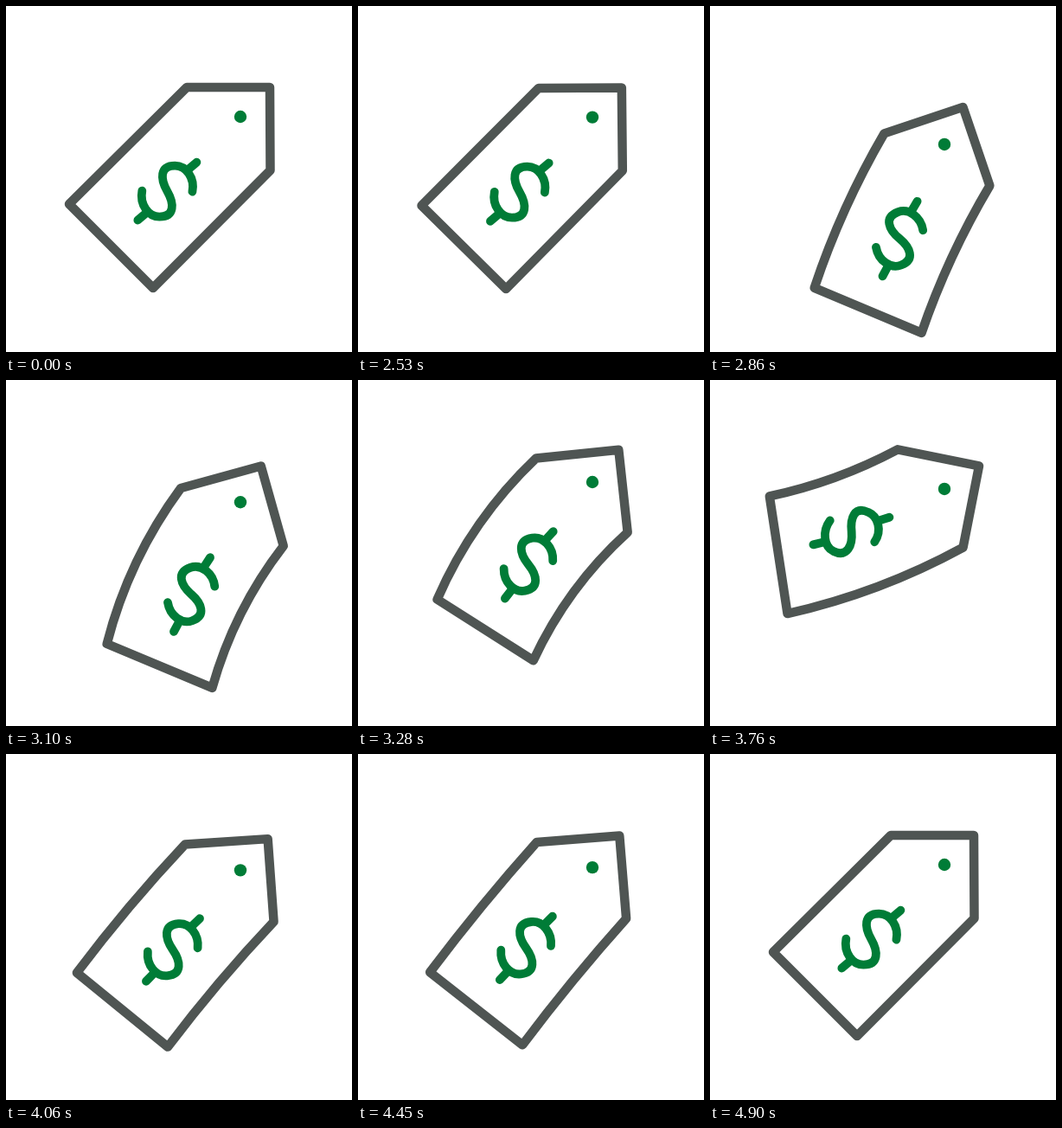
Animation of 400 by 400 pixels, one loop 4990 ms. Source, as an HTML page with a canvas:

```html
<!DOCTYPE html>
<html lang="en">
<head>
<meta charset="utf-8">
<title>Swinging price tag</title>
<style>
  html, body { margin: 0; width: 100%; height: 100%; overflow: hidden; background: #fff; }
  canvas { display: block; width: 100vmin; height: 100vmin; }
</style>
</head>
<body>
<canvas id="stage" width="400" height="400"></canvas>
<script>
const ctx = document.getElementById('stage').getContext('2d');
const LOOP = 4990, START = 2530, STEP = 30;
const REST = 2500, SETTLED = 4900;
const GREY = '#4f5553', GREEN = '#007c37';
const HOLE_X = 271, HOLE_Y = 128;

// Tag geometry relative to the hole, at rest
const A = [-62, -34], B = [34, -34], C = [34.5, 62], D = [-101, 198], E = [-198, 101];
const PIVOT = [-78, 78], PRINT = [-84.5, 86.5];
const LENGTH = 191.8, WIDTH = 136.6;

const rad = deg => deg * Math.PI / 180;
const add = (p, q) => [p[0] + q[0], p[1] + q[1]];
const sub = (p, q) => [p[0] - q[0], p[1] - q[1]];
const scale = (p, f) => [p[0] * f, p[1] * f];
const mix = (p, q, f) => add(scale(p, 1 - f), scale(q, f));
function rotate([x, y], a) {
  const c = Math.cos(a), s = Math.sin(a);
  return [x * c - y * s, x * s + y * c];
}

// Three eased swings out of rest, then back to rest
function swing(t, times, peaks) {
  const at = [REST, ...times, SETTLED], values = [0, ...peaks, 0];
  if (t <= REST || t >= SETTLED) return 0;
  const i = at.findIndex(end => t < end) - 1;
  const s = (t - at[i]) / (at[i + 1] - at[i]);
  return values[i] + (values[i + 1] - values[i]) * s * s * (3 - 2 * s);
}

// The hole leads, the head follows, the tail lags behind
function poseAt(t) {
  const tailTimes = [3230, 3750, 4120];
  return {
    y: HOLE_Y + swing(t, [2870, 3430, 3970], [32, -19, 6.5]),
    head: rad(swing(t, [2920, 3710, 4170], [-19.6, 12, -6.5])),
    bend: rad(swing(t, tailTimes, [-7.5, 25, -4])),
    curl: rad(swing(t, tailTimes, [-12, 8, -4]))
  };
}

// A long edge bows into an even arc
function edge(from, to, curl) {
  const third = scale(sub(to, from), 1 / 3);
  return [from, add(from, rotate(third, -curl)), sub(to, rotate(third, curl)), to];
}
function onCurve([p, q, r, s], t) {
  const a = mix(p, q, t), b = mix(q, r, t), c = mix(r, s, t);
  return mix(mix(a, b, t), mix(b, c, t), t);
}
function trace(points) {
  for (let i = 1; i < points.length; i += 3) {
    ctx.bezierCurveTo(...points[i], ...points[i + 1], ...points[i + 2]);
  }
}

// Half a dollar sign around its centre; the other half is its point reflection
const HALF_S = [[29, 0.5], [32, -15], [22, -29.5], [9, -29.5], [-9, -29.5], [-8, -14], [0, 0]];
const STEM = [[34, -33.5], [24.5, -25.5]];

function draw(time) {
  const { y, head, bend, curl } = poseAt(time);
  const place = p => add([HOLE_X, y], rotate(p, head));
  const pinch = 1 - 0.2 * Math.max(0, -curl);
  const tail = p => add(PIVOT, rotate(sub(mix(mix(D, E, 0.5), p, pinch), PIVOT), bend));
  const [a, b, c, d, e] = [A, B, C, tail(D), tail(E)].map(place);

  ctx.fillStyle = '#fff';
  ctx.fillRect(0, 0, 400, 400);
  ctx.lineCap = ctx.lineJoin = 'round';

  ctx.strokeStyle = GREY;
  ctx.lineWidth = 10.5;
  ctx.beginPath();
  ctx.moveTo(...a);
  trace(edge(a, e, curl));
  ctx.lineTo(...d);
  trace(edge(c, d, curl).reverse());
  ctx.lineTo(...b);
  ctx.closePath();
  ctx.stroke();

  ctx.fillStyle = ctx.strokeStyle = GREEN;
  ctx.beginPath();
  ctx.arc(HOLE_X, y, 7.2, 0, Math.PI * 2);
  ctx.fill();

  // The print bends with the tag, but only half as much as its edges
  const left = edge(a, e, curl / 2), right = edge(c, d, curl / 2);
  const warp = p => {
    const [across, along] = rotate(sub(add(PRINT, p), A), -Math.PI / 4);
    return mix(onCurve(left, along / LENGTH), onCurve(right, along / LENGTH), across / WIDTH);
  };
  ctx.lineWidth = 9.8;
  ctx.beginPath();
  for (const side of [1, -1]) {
    const half = HALF_S.map(p => warp(scale(p, side)));
    const stem = STEM.map(p => warp(scale(p, side)));
    ctx.moveTo(...half[0]);
    trace(half);
    ctx.moveTo(...stem[0]);
    ctx.lineTo(...stem[1]);
  }
  ctx.stroke();
}

const origin = performance.now();
function tick() {
  const t = (performance.now() - origin) % LOOP;
  draw(t < START ? 0 : START + Math.floor((t - START) / STEP) * STEP);
  requestAnimationFrame(tick);
}
tick();
</script>
</body>
</html>
```
